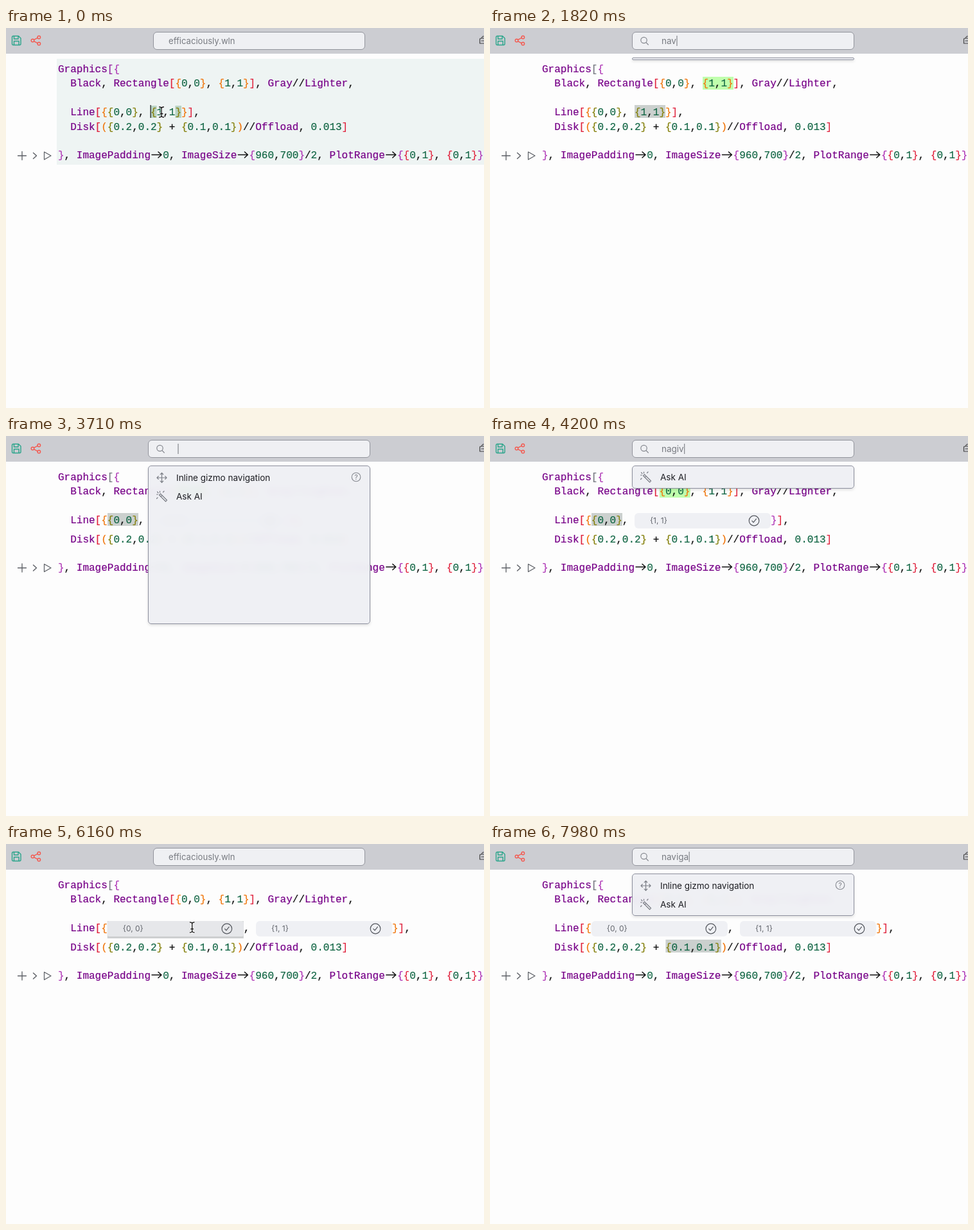
Recreate the animation shown at these times as an HTML page. Size 744 by 592 pixels, loop 8 s.

```html
<!DOCTYPE html>
<html lang="en">
<head>
<meta charset="utf-8">
<title>Notebook command palette</title>
<style>
html, body { margin: 0; width: 744px; height: 592px; overflow: hidden; background: #fdfdfd; }
svg { position: absolute; left: 0; top: 0; }
.code { font: 16px "Liberation Mono", monospace; white-space: pre; stroke-width: .2px; }
.ui { font-family: Inter, "Liberation Sans", sans-serif; }
.line { fill: none; stroke-linecap: round; stroke-linejoin: round; }
#panel {
  position: absolute; left: 221px; top: 46px; width: 346px; box-sizing: border-box;
  border: 1px solid #8d909e; border-radius: 5px; background: rgba(239, 240, 244, .94);
  backdrop-filter: blur(6px); box-shadow: 0 2px 4px rgba(0, 0, 0, .12);
}
</style>
</head>
<body>
<svg id="page" width="744" height="592"></svg>
<div id="panel"></div>
<svg id="top" width="744" height="592"></svg>
<script>
const LOOP = 8000, CH = 9.6, LEFT = 81, WIDGET = 212;
const page = document.getElementById('page');
const overlay = document.getElementById('top');
const panel = document.getElementById('panel');
const BRACKETS = ['#777b82', '#ae35b5', '#e0243f', '#f07408', '#85810c'];

// Palette text and list: time, query, list kind
const STEPS = [
  [0, null], [1260, '', 'all'], [1540, 'n', 'all'], [1680, 'na', 'all'],
  [1820, 'nav', 'none'], [1890, 'nav', 'nav'], [1960, 'navi', 'both'],
  [2100, 'navig', 'both'], [2240, null],
  [3570, '', 'all'], [3780, 'n', 'all'], [3920, 'na', 'none'], [3990, 'nag', 'ask'],
  [4060, 'nagi', 'ask'], [4200, 'nagiv', 'ask'], [4410, 'nagi', 'ask'],
  [4550, 'nag', 'ask'], [4690, 'na', 'ask'], [4900, 'n', 'all'],
  [5040, 'na', 'both'], [5180, 'nav', 'both'], [5320, 'navi', 'both'],
  [5530, 'navig', 'nav'], [5670, 'navig', 'both'], [5740, null],
  [7210, '', 'all'], [7420, 'n', 'all'], [7560, 'na', 'none'], [7630, 'nav', 'nav'],
  [7700, 'navi', 'both'], [7840, 'navig', 'both'], [7980, 'naviga', 'both']
];
const HEIGHT = { none: 4, ask: 36, nav: 38, both: 66, all: 247 };

// Drags: start, end, end of selection, x, y, characters
const DRAGS = [
  [350, 770, 2240, 225, 120, 5],
  [3080, 3500, 5740, 158, 120, 5],
  [6440, 6930, 8001, 273.4, 149, 9]
];
const MOUSE = [
  [[0, 242, 131], [350, 226, 131], [770, 274, 131], [1260, 282, 134]],
  [[2450, 262, 100], [2800, 169, 140], [3080, 159, 131], [3500, 207, 131], [3570, 209, 132]],
  [[5950, 300, 110], [6440, 274, 160], [6930, 357, 160], [7210, 357, 160]]
];

const ease = u => u * u * (3 - 2 * u);
const rect = (x, y, w, h, fill, more = '') =>
  `<rect x="${x}" y="${y}" width="${w}" height="${h}" fill="${fill}" ${more}/>`;
const line = (d, color, width = 1.2, x = 0, y = 0) =>
  `<path class="line" d="${d}" stroke="${color}" stroke-width="${width}" transform="translate(${x} ${y})"/>`;
const label = (x, y, str, size, fill, more = '') =>
  `<text class="ui" x="${x}" y="${y}" font-size="${size}" fill="${fill}" ${more}>${str}</text>`;
const circle = (x, y, r, color, width = 1.2) =>
  `<circle cx="${x}" cy="${y}" r="${r}" fill="none" stroke="${color}" stroke-width="${width}"/>`;

function widget(x, value, marked) {
  const back = marked
    ? rect(x, 120, WIDGET, 27, '#cdcfd0') + rect(x, 120, WIDGET, 24, '#e6e7ea', 'rx="3"')
    : rect(x, 120, WIDGET, 24, '#eff0f4', 'rx="6"');
  return back + label(x + 24, 136, value, 12, '#63666d') +
    circle(x + 186, 132, 7.8, '#55585f') +
    line('M-3.2 .2L-1 2.6L3.4-2.8', '#55585f', 1.2, x + 186, 132);
}

// Writes one line of code; @ stands for an inline widget
function code(str, y, depth, s) {
  const values = s.widgets > 1 ? ['{0, 0}', '{1, 1}'] : ['{1, 1}'];
  let x = LEFT, out = '', last = '';
  for (const tok of str.match(/\d[\d.]*|[A-Za-z]+|->|./g)) {
    if (tok === '@') {
      const v = values.shift();
      out += widget(x, v, s.marked && (s.widgets < 2 || v === '{0, 0}'));
      x += WIDGET;
    } else if (tok === '->') {
      out += line('M2 0H17M12-4.5L17 0L12 4.5', '#111', 1.5, x, y - 5.5);
      x += 2 * CH;
    } else {
      let fill = '#111';
      if (/[\[{(]/.test(tok)) fill = BRACKETS[depth++];
      else if (/[\]})]/.test(tok)) fill = BRACKETS[--depth];
      else if (/\d/.test(tok)) fill = '#116644';
      else if (/[A-Z]/i.test(tok)) fill = '#770088';
      if (tok === '[' && depth === 1 && s.focus) fill = '#9a2aa5';
      if (tok === '}' && last === '@' && s.widgets === 1) fill = BRACKETS[1];
      if (tok !== ' ') out += `<text class="code" x="${x.toFixed(1)}" y="${y}" fill="${fill}" stroke="${fill}">${tok}</text>`;
      x += tok.length * CH;
    }
    last = tok;
  }
  return out;
}

function toolbar(open) {
  const green = '#2ba58b', red = '#f35b52';
  let out = rect(0, 0, 744, 40, '#cccdd2');
  out += line('M2 .5H10.5L14 4V12.5Q14 14.5 12 14.5H2.5Q.5 14.5 .5 12.5V2.5Q.5 .5 2.5 .5M3.5 .8V5H10V.8M3.5 14.3V8.5H11V14.3', green, 1.4, 9, 12);
  out += line('M4.5 6.3L10.5 3.2M4.5 8.7L10.5 11.8', red, 1.4, 39, 12);
  for (const [x, y] of [[41.5, 19.5], [51.3, 14.5], [51.3, 24.5]]) out += circle(x, y, 2.3, red, 1.4);
  out += line('M8 2H2.5Q.5 2 .5 4V10H8M3 2L5-1H8M3 6H8', '#444', 1.2, 737, 14);
  const [x, w] = open ? [221.5, 345] : [229.5, 329];
  out += rect(x, 6.5, w, 27, '#eff0f3', 'rx="5.5" stroke="#92949c"');
  if (!open) out += label(253, 25, 'efficaciously.wln', 13.1, '#777a80');
  else out += circle(239.5, 19, 4.7, '#85888f') + line('M243 22.6L246.3 26', '#85888f');
  return out;
}

function gutter(y) {
  const c = '#5b5e64';
  return line('M18.5 0H31.5M25-6.5V6.5', c, 1.3, 0, y) +
    line('M42.5-4.5L47.5 0L42.5 4.5', c, 1.4, 0, y) +
    line('M59.5-6L70 0L59.5 6Z', c, 1.2, 0, y);
}

const ICONS = {
  move: line('M0-7.5V7.5M-7.5 0H7.5M-2.3-5.2L0-7.5L2.3-5.2M-2.3 5.2L0 7.5L2.3 5.2M-5.2-2.3L-7.5 0L-5.2 2.3M5.2-2.3L7.5 0L5.2 2.3', '#7b7e86'),
  wand: line('M-4-2L-2-4L8 6L6 8ZM-1.5 .5L.5-1.5M-3-8V-6M-8-3H-6M-7-7L-5.5-5.5M2-6.5L3.5-8M-6.5 2L-8 3.5', '#7b7e86')
};

function row(name, icon, y, help) {
  let out = `<g transform="translate(242.5 ${y})">${ICONS[icon]}</g>` + label(265, y + 5, name, 13.5, '#1c1d22');
  if (help) out += circle(545, y - 1, 6.8, '#85888f', 1.1) +
    label(545, y + 2.6, '?', 10, '#75787f', 'text-anchor="middle"');
  return out;
}

function list(kind) {
  if (kind === 'none') return '';
  if (kind === 'ask') return row('Ask AI', 'wand', 64);
  const nav = row('Inline gizmo navigation', 'move', 65, true);
  return kind === 'nav' ? nav : nav + row('Ask AI', 'wand', 94);
}

function mouseAt(t) {
  const path = MOUSE.find(p => t >= p[0][0] && t < p[p.length - 1][0]);
  if (!path) return '';
  const i = path.findIndex(p => p[0] > t), a = path[i - 1], b = path[i];
  const k = ease((t - a[0]) / (b[0] - a[0]));
  const x = a[1] + (b[1] - a[1]) * k, y = a[2] + (b[2] - a[2]) * k;
  const d = 'M-3.5-8Q-.5-8 0-6Q.5-8 3.5-8M0-6V6M-3.5 8Q-.5 8 0 6Q.5 8 3.5 8M-2 2.5H2';
  return line(d, '#fff', 2.8, x, y) + line(d, '#111', 1.3, x, y);
}

// The dragged range at time t, snapped to whole characters
function dragAt(t) {
  const drag = DRAGS.find(d => t >= d[0] && t < d[2]);
  if (!drag) return null;
  const [from, to, , x, y, n] = drag;
  const u = Math.min(1, (t - from) / (to - from));
  return { x, y, n, w: Math.round(ease(u) * n) * CH, done: u === 1 };
}

function selection(t, s) {
  if (t < 350) return rect(225, 121, 9.6, 19, '#b9d3c5') + rect(263.4, 121, 9.6, 19, '#b9d3c5');
  const d = dragAt(t);
  if (!d) return '';
  let out = rect(d.x, d.y, d.w, 20, s.focus ? '#cfcee3' : '#cbd0ce');
  if (d.n === 5 && d.done) out += rect(d.x < 200 ? 263.8 : 331, 76, 48, 20, '#c0ffad');
  return out;
}

function caret(t, s) {
  if (!s.focus) return '';
  if (t < 350) return rect(224.5, 120, 1.2, 20, '#111');
  const d = dragAt(t);
  return d ? rect(d.x + d.w - .5, d.y, 1, 20, '#111') : '';
}

let lastPage = '', lastOver = '';
function render(t) {
  const [, query, kind] = STEPS.filter(s => s[0] <= t).pop();
  const open = query !== null;
  const s = {
    widgets: t < 2310 ? 0 : t < 5810 ? 1 : 2,
    focus: t < 1260 || (t >= 3080 && t < 3570) || (t >= 6440 && t < 7210),
    marked: (t >= 2310 && t < 3080) || (t >= 5810 && t < 6440)
  };
  const drop = s.widgets ? 6.5 : 0;
  const points = ['{{0,0}, {1,1}}', '{{0,0}, @}', '{@, @}'][s.widgets];

  const html = (s.focus ? rect(79, 48, 665, 165 + drop, '#eef4f3') : '') +
    toolbar(open) + gutter(199 + drop) + selection(t, s) +
    code('Graphics[{', 69, 0, s) +
    code('  Black, Rectangle[{0,0}, {1,1}], Gray//Lighter,', 91, 2, s) +
    code(`  Line[${points}],`, 136, 2, s) +
    code('  Disk[({0.2,0.2} + {0.1,0.1})//Offload, 0.013]', 159 + drop, 2, s) +
    code('}, ImagePadding->0, ImageSize->{960,700}/2, PlotRange->{{0,1}, {0,1}}', 203 + drop, 2, s) +
    caret(t, s) + mouseAt(t);
  if (html !== lastPage) page.innerHTML = lastPage = html;

  const over = open ? list(kind) + label(267, 25, query, 13.5, '#777a80', 'id="query"') : '';
  if (over !== lastOver) {
    overlay.innerHTML = lastOver = over;
    if (open) {
      const w = query ? document.getElementById('query').getComputedTextLength() : 0;
      overlay.insertAdjacentHTML('beforeend', rect(267.5 + w, 12, 1, 16, '#6f7278'));
    }
  }
  panel.style.display = open ? 'block' : 'none';
  if (open) panel.style.height = HEIGHT[kind] + 'px';
}

const start = performance.now();
function tick() {
  render((performance.now() - start) % LOOP);
  requestAnimationFrame(tick);
}
tick();
</script>
</body>
</html>
```
